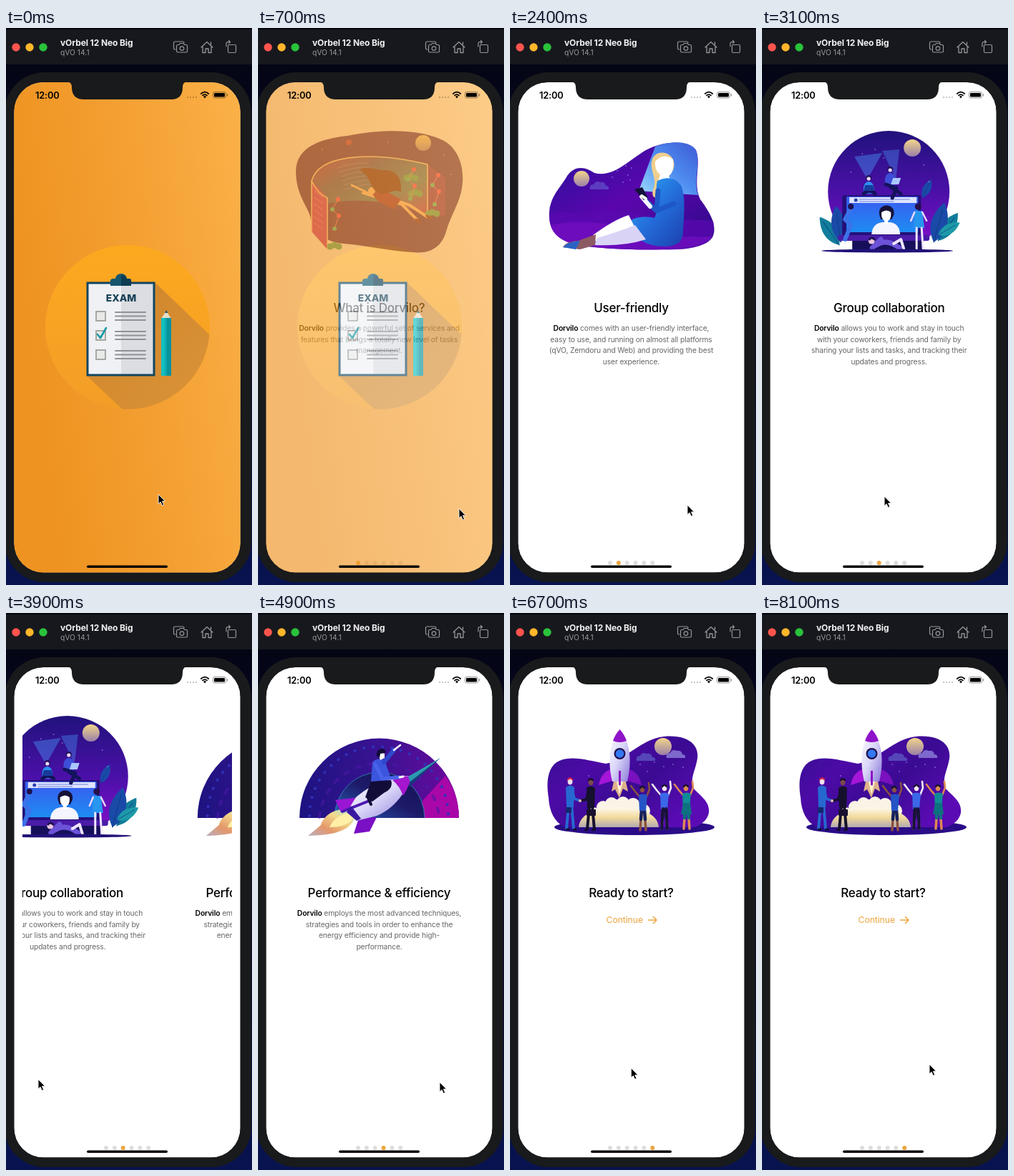
Write an HTML page that moves like this. It is 344x780 px and loops after 9 s.

```html
<!DOCTYPE html>
<html lang="en">
<head>
<meta charset="utf-8">
<title>Onboarding</title>
<style>
html, body { margin: 0; width: 100%; height: 100%; overflow: hidden; background: #05071c; }
svg { display: block; width: 344px; height: 780px; }
text { font-family: Inter, "Liberation Sans", sans-serif; }
.title { font-size: 17px; font-weight: 500; letter-spacing: -.25px; fill: #000; text-anchor: middle; }
.body { font-size: 10.3px; letter-spacing: -.13px; fill: #666; text-anchor: middle; }
.body tspan { font-weight: 600; fill: #000; }
</style>
</head>
<body>
<svg id="stage" viewBox="0 0 344 780"></svg>
<script>
const LOOP = 9000, STEP = 100, PAGE = 293, SWIPE = 600;
const SWIPES = [1420, 2560, 3689, 4960, 6045];
const FADE = [480, 1110];
const CURSOR = [
  [0, 213, 653], [100, 214, 654], [700, 281, 673], [1300, 262, 668], [1650, 52, 656],
  [2300, 248, 668], [2450, 248, 668], [2780, 48, 654], [3350, 256, 657], [3580, 254, 657],
  [3900, 45, 653], [4600, 254, 657], [4900, 254, 657], [5180, 50, 652], [5800, 244, 654],
  [6000, 236, 654], [6100, 195, 652], [6300, 38, 648], [6950, 234, 632], [9000, 234, 632]
];

// Drawing helpers
const p = (d, fill, more = '') => `<path d="${d}" fill="${fill}" ${more}/>`;
const l = (d, color, w = 2, more = '') =>
  `<path d="${d}" fill="none" stroke="${color}" stroke-width="${w}" stroke-linecap="round" stroke-linejoin="round" ${more}/>`;
const c = (x, y, r, fill, more = '') => `<circle cx="${x}" cy="${y}" r="${r}" fill="${fill}" ${more}/>`;
const e = (x, y, rx, ry, fill, more = '') => `<ellipse cx="${x}" cy="${y}" rx="${rx}" ry="${ry}" fill="${fill}" ${more}/>`;
const r = (x, y, w, h, fill, rx = 0, more = '') =>
  `<rect x="${x}" y="${y}" width="${w}" height="${h}" rx="${rx}" fill="${fill}" ${more}/>`;
const g = (body, more = '') => `<g ${more}>${body}</g>`;
const grad = (id, dir, ...colors) => {
  const [x1, y1, x2, y2] = dir;
  const stops = colors.map((k, i) => `<stop offset="${i / (colors.length - 1)}" stop-color="${k}"/>`).join('');
  return `<linearGradient id="${id}" x1="${x1}" y1="${y1}" x2="${x2}" y2="${y2}">${stops}</linearGradient>`;
};
const DOWN = [0, 0, 0, 1], RIGHT = [0, 0, 1, 0], DIAG = [0, 0, 1, 1];

const stars = (list, color = '#b8a8ff') => list.map(([x, y]) => c(x, y, .7, color)).join('');
const cloud = (x, y, k, fill) =>
  p('M-13 5Q-15 -2 -8 -2Q-5 -8 1 -5Q8 -6 9 0Q14 0 13 5Z', fill, `transform="translate(${x} ${y}) scale(${k})"`);
const leaf = (x, y, a, k, fill) =>
  g(p('M0 0C-9 -10 -7 -22 0 -32C8 -22 9 -10 0 0Z', fill) + l('M0 0V-26', '#0d3f86', .6),
    `transform="translate(${x} ${y}) rotate(${a}) scale(${k})"`);
const screen = fill => r(11.3, 76, 316.4, 686.5, fill, 41);

const defs = '<defs>' +
  grad('desk', DOWN, '#03040f', '#070a2c', '#050a35', '#081350') +
  grad('splashBg', [0, .3, 1, 0], '#ee9321', '#f4a033', '#fbb148') +
  grad('disc', DOWN, '#fda91f', '#f39d27') +
  grad('shade', DIAG, '#cf8428', '#dc963c') +
  grad('night', DIAG, '#25119a', '#5b06ad', '#2a0a86') +
  grad('dusk', DOWN, '#21127c', '#4a10a8', '#8a0fd0') +
  grad('violet', [0, 0, 1, .6], '#32108f', '#4c0aa6', '#3a0b92', '#5a0bb4') +
  grad('moon', DOWN, '#f3d58a', '#9a7fa8') +
  grad('dress', DIAG, '#2fb4f4', '#2470dd', '#1b3fae') +
  grad('beam', [0, 1, 1, 0], '#9edcff', '#4f8ef0', '#3c5ad6') +
  grad('hull', DIAG, '#ffffff', '#d9d6f8', '#8a78d8') +
  grad('fire', [1, 0, 0, 1], '#9ae4ee', '#f2d98a', '#e4976a', '#b9aec0') +
  grad('arc', RIGHT, '#1d1380', '#3a1292', '#6a0a9c') +
  grad('inner', [0, 1, 1, 0], '#2a62b8', '#1d1a6a', '#12134e') +
  grad('shield', RIGHT, '#b018d8', '#7d16d2', '#3f1cc4') +
  grad('smoke', DOWN, '#fffaf0', '#f2da9c', '#b3aab0') +
  grad('screen', DIAG, '#a81a78', '#31508e', '#2b8f9a', '#d8147a') +
  grad('laptop', DOWN, '#3a5bf0', '#1e8cf2') +
  `<clipPath id="view">${r(23, 105, PAGE, 636, '#000')}</clipPath>` +
  `<clipPath id="glass">${screen('#000')}</clipPath>` +
  `<clipPath id="round">${c(170, 419, 115, '#000')}</clipPath></defs>`;

// Illustrations
function library() {
  const blob = 'M53 200C54 165 90 155 125 151C170 142 225 140 260 158C285 172 290 205 284 230C279 250 270 262 264 282' +
    'C258 306 242 317 215 314C180 312 150 304 120 302C96 300 78 288 74 268C72 252 53 236 53 200Z';
  const node = (x, y, k) => c(x, y, 3, k);
  const chain = (x, y) => l(`M${x} ${y}l-8 14l9 9l-6 18`, '#f06a9a', 1) +
    node(x, y, '#ff2a7a') + node(x - 8, y + 14, '#20c090') + node(x + 1, y + 23, '#ff2a7a') + node(x - 5, y + 41, '#20c090');
  const bush = (x, y) => [0, 6, 12].map(d => c(x + d, y - d % 4, 4.5, '#2aa878')).join('');
  let rows = '';
  for (let i = 0; i < 6; i++) {
    rows += l(`M${112 + i * 2} ${196 + i * 6}q22 -8 42 -7`, '#8f86e0', 1, 'opacity=".6"');
    rows += l(`M79 ${228 + i * 9}l12 9`, '#f08ac0', 1, 'opacity=".7"');
  }
  return p(blob, '#34106c') +
    p('M75 214C84 183 150 170 237 191V264C205 244 140 236 97 246Z', 'url(#screen)', 'opacity=".75"') +
    p('M237 191L262 210V262L237 264Z', '#c01890', 'opacity=".35"') +
    p('M75 214L97 238V310L75 285Z', '#b81890') + rows +
    l('M75 285V214C84 180 150 170 237 191V264M75 214Q82 231 97 238V310', '#f5d6b0', 1.6) +
    c(231, 161, 11, 'url(#moon)') + stars([[90, 170], [127, 160], [260, 178], [270, 205], [182, 160]], '#ffd9a0') +
    c(127, 160, 4, '#a02060') + bush(208, 210) + bush(214, 232) + bush(238, 260) + bush(101, 306) +
    chain(218, 198) + chain(252, 206) + chain(112, 240) +
    l('M160 234L131 220M162 236L146 231', '#ffc39a', 3) +
    l('M182 243L200 246L222 268M188 240L212 248L236 264', '#ffc39a', 4) +
    l('M221 268l5 4M236 263l5 3', '#5a1030', 3.5) +
    p('M158 230L180 229L200 240L190 254L168 243Z', '#7a1048') + c(159, 228, 5, '#ffc39a') +
    p('M142 199C152 191 166 200 180 199C194 200 202 212 200 230C190 224 182 234 170 232C156 226 160 210 142 199Z', '#48102c');
}

function reader() {
  const blob = 'M55 266C53 238 70 225 80 207C92 190 108 196 118 203C144 210 165 186 190 171C214 158 248 156 260 171' +
    'C268 190 255 218 266 240C278 256 290 275 284 291C278 306 250 310 214 310C170 311 120 309 90 303C66 296 56 284 55 266Z';
  return p(blob, 'url(#night)') +
    p('M55 262C80 250 90 268 118 260C150 250 178 262 210 266L284 270C288 292 280 306 240 310C180 312 110 309 85 301C64 294 55 282 55 262Z', '#5a08b0', 'opacity=".75"') +
    p('M57 276Q110 266 160 280T284 292Q274 308 214 310C170 311 120 309 90 303C70 298 60 288 57 276Z', '#7c10c8', 'opacity=".55"') +
    p('M180 228L203 166C222 158 252 157 260 171C267 190 256 214 263 234Z', 'url(#beam)') +
    c(100, 211, 11, 'url(#moon)') + cloud(125, 221, 1, '#5b3cc0') +
    stars([[143, 209], [150, 200], [158, 216], [165, 206], [170, 196], [168, 213], [162, 193]]) +
    p('M199 184C204 170 225 172 229 187C232 200 222 206 218 214L210 238C200 240 197 234 201 224C206 210 194 198 199 184Z', '#f0cf8e') +
    p('M203 187Q214 174 228 184Q230 202 222 207L226 216H207L210 205Q202 200 203 187Z', '#fff') +
    p('M206 214C218 208 232 208 240 222C246 240 243 262 242 286C242 300 232 306 216 306C190 306 176 294 162 280C164 266 184 262 202 266C210 250 202 230 206 214Z', 'url(#dress)') +
    l('M207 228L205 256L190 242M205 256L229 246', '#1e58c8', 7) + l('M196 250L184 236', '#f7f5ff', 6) +
    p('M174 226l11 -3l8 15l-6 3Z', '#111138') + l('M190 239l-6 -4', '#fff', 4) +
    p('M166 262Q146 268 116 290L120 300Q154 292 176 282Z', '#ffffff') +
    p('M175 276Q150 286 122 294L118 304Q160 306 190 296Z', '#d9d4f6') +
    p('M120 289L95 298Q78 299 74 307L98 310L119 304Z', '#8d5a63') + p('M98 298Q80 299 74 307L92 310Z', '#2b63c4');
}

function team() {
  const person = (x, y, coat) => c(x, y, 4, '#231055') + c(x, y + 1, 2.6, '#e9d9ff') +
    p(`M${x - 7} ${y + 22}Q${x - 9} ${y + 6} ${x} ${y + 5}Q${x + 9} ${y + 6} ${x + 7} ${y + 22}Z`, coat);
  return c(169, 229, 85, 'url(#dusk)') +
    leaf(238, 298, 35, 1.5, '#117d9b') + leaf(232, 300, 15, 1.8, '#1a4aa8') + leaf(238, 290, 60, 1.1, '#1d9aa8') +
    leaf(100, 304, -35, 1.5, '#117d9b') + leaf(102, 300, -8, 1.6, '#1a4aa8') + leaf(216, 238, 25, .9, '#1a4aa8') +
    c(202, 168, 12, 'url(#moon)') + stars([[150, 170], [162, 182], [218, 192], [132, 176], [225, 215], [116, 202]]) +
    p('M139 212L121 180L160 175Z', '#4aa0ff', 'opacity=".4"') + p('M179 212L160 172L184 170Z', '#4aa0ff', 'opacity=".35"') +
    r(104, 234, 110, 58, '#241078', 3) + r(110, 236, 100, 50, 'url(#laptop)', 1) +
    r(114, 237, 94, 8, '#dfe4ff') + c(123, 241, 2.5, '#2840b8') + l('M128 240H198M128 243H176', '#7183dc', 1) +
    r(98, 290, 128, 8, '#4a1ca8', 3) + r(118, 298, 98, 14, '#16105a') +
    p('M145 289Q146 274 160 272H171Q184 274 185 289Z', '#f5f5ff') +
    p('M156 262C152 244 180 244 176 262L173 268H158Z', '#171138') + p('M159 258Q166 253 172 258Q173 268 168 270V275H163V270Q158 267 159 258Z', '#fff') +
    person(141, 210, '#2a8ff0') + person(171, 198, '#3d4ed8') +
    l('M134 232Q142 224 150 232M165 219L180 224L174 238M172 223L186 232', '#14135c', 5) +
    p('M175 210h11l-3 9h-11Z', '#a9c8ff') + p('M136 220h11l2 8h-15Z', '#173c9c') +
    l('M115 255L108 268L116 276L108 296', '#3b72e8', 6) + c(116, 250, 4, '#1d1150') +
    c(210, 250, 4.5, '#27104a') + p('M205 256H216L219 280H204Z', '#2796ee') +
    l('M208 280V310M215 280L217 310', '#f0e5ff', 3) + l('M205 258L200 270M216 258L222 270', '#e9d9ff', 2.5) +
    l('M152 304Q166 294 184 308M146 308L158 296', '#6b52d8', 7) + c(145, 298, 4.5, '#eac5df') + l('M142 296q3 -4 7 0', '#1d1150', 3) +
    l('M176 302L186 296L190 309', '#f0e5ff', 4) + e(167, 312, 92, 2.5, '#201278');
}

function rocketRide() {
  return p('M58 287A111 111 0 0 1 281 287Z', 'url(#arc)') +
    p('M230 263L262 228Q281 255 281 287H230Z', '#a907a8') +
    l('M72 284A97 97 0 0 1 266 284', '#3030b8', 4, 'stroke-dasharray=".1 13"') +
    l('M86 286A84 84 0 0 1 253 284', '#4a18a6', 4, 'stroke-dasharray="6 12" opacity=".6"') +
    p('M107 287A62 63 0 0 1 233 287Z', 'url(#inner)') + l('M107 287A62 63 0 0 1 233 287', '#34b3cf', 1, 'opacity=".6"') +
    p('M131 277C112 270 92 282 88 297L70 312C92 311 126 310 135 288Z', 'url(#fire)') +
    p('M128 279Q106 285 100 300Q124 300 134 287Z', '#fff0a8') +
    p('M142 258L108 262L116 279L134 274Z', '#9a16d4') + p('M166 286L156 306L134 309L141 287Z', '#7a0fc4') +
    p('M124 279L137 258C160 238 188 228 212 228C208 252 190 274 166 284L138 291Z', 'url(#hull)') +
    p('M188 234Q204 228 214 228Q213 240 203 256Q198 242 188 234Z', '#a516cf') +
    p('M210 229L255 203L214 240Z', '#2c9aae') + p('M213 236L255 203L211 244Z', '#18377e') +
    l('M118 278L158 262', '#4b18ae', 4) + p('M124 279L130 270L144 288L138 291Z', '#3818a0') +
    p('M160 209Q166 202 177 206L186 232L168 241L158 236Z', '#3b55dc') +
    l('M176 209L190 192', '#3048cc', 6) + l('M190 192L199 185', '#fff', 2.5) +
    l('M164 212L174 232L198 230', '#4a63ea', 5) + l('M198 230l5 -1', '#fff', 3) +
    p('M158 236L186 234Q190 246 176 252L160 264L150 258Z', '#120c38') + l('M154 259l4 9', '#120c38', 4) +
    p('M168 198Q172 193 177 197L177 203L171 206Z', '#fff') + p('M166 200Q165 190 174 190Q180 192 178 196L171 197L170 203Z', '#120c38');
}

function knights() {
  const knight = (x, y, k) => g(
    l('M-3 26L-7 42L-6 58M3 26L7 42L9 58', '#2a2e70', 5) +
    l('M-5 34L-7 42M-7 47L-6 56M6 34L7 42M8 47L9 56', '#d3d8f4', 3) +
    l('M-6 59h-4M9 59h4', '#8f9bd4', 3) +
    p('M-9 10Q0 5 9 10L7 21L4 28H-5L-7 21Z', '#3a4288') + p('M-7 11Q-2 9 -1 10V19L-6 20Z', '#e6e9fb') +
    p('M1 10Q6 9 7 11L6 19L1 20Z', '#9aa6dc') + p('M-6 22H6L8 31H1L0 27L-1 31H-8Z', '#c3caee') +
    l('M-9 12L-13 20L-11 26M9 12L13 19L10 25', '#2a2e70', 4) + c(-10, 11, 3, '#e6e9fb') + c(10, 11, 3, '#9aa6dc') +
    p('M-5 7V-2Q0 -8 5 -2V7L0 10Z', '#e6e9fb') + p('M0 -5Q5 -5 5 0V7L0 10Z', '#7482c2') + r(-3.5, 0, 8, 2, '#1a1a4a'),
    `transform="translate(${x} ${y}) scale(${k})"`);
  const sword = d => l(d, '#e7edff', 2) + l(d, '#7d8dd2', .6);
  const arm = p('M90 212C76 203 58 206 52 224C51 230 55 231 58 226C55 240 66 250 72 262C78 274 77 290 78 300H93' +
    'C94 276 88 258 76 246C66 236 64 222 72 217C70 226 74 234 84 238C80 228 82 220 90 218Z', '#0d0a2c');
  return p('M79 298C76 240 92 190 118 166C142 145 188 144 213 166C238 190 251 240 248 298Z', '#181265') +
    stars([[128, 174], [138, 164], [150, 160], [170, 158], [222, 198], [116, 190], [212, 188]]) + c(195, 171, 11, 'url(#moon)') +
    p('M50 298C46 274 64 252 88 249C108 236 134 248 162 246C194 242 220 238 244 250C270 256 282 276 273 298Q268 310 254 310H60Q53 308 50 298Z', 'url(#dusk)') +
    p('M163 164Q186 182 214 181C220 236 206 286 163 307C118 286 106 236 110 181Q140 182 163 164Z', '#5a14ac') +
    p('M163 172Q184 187 207 187C211 236 198 280 163 299C126 280 114 236 117 187Q142 187 163 172Z', 'url(#shield)') +
    p('M163 164Q186 182 214 181C220 236 206 286 163 307Z', '#281aa8', 'opacity=".35"') +
    e(164, 214, 25, 31, '#5d1696') + arm + g(arm, 'transform="translate(326 0) scale(-1 1)"') +
    sword('M114 212L118 242') + sword('M205 211L198 242') + knight(116, 239, .98) + knight(201, 239, .98) +
    p('M93 236L107 233L109 254L99 264Z', '#a45878') + p('M211 240L222 236L224 258L214 264Z', '#a45878') +
    sword('M138 207L135 258') + l('M130 253H141', '#dfe3fb', 2) + knight(159, 246, 1.06) + l('M150 258L137 257', '#c3caee', 3.5) +
    p('M159 250Q172 248 182 243Q187 265 172 282Q160 271 159 250Z', '#f2dfa8', 'stroke="#a5b5d5" stroke-width="1.5"') +
    p('M171 248L182 243Q187 265 172 282Z', '#8ec0d4', 'opacity=".5"');
}

function launch() {
  const blob = 'M54 259C50 236 53 214 69 207C88 199 110 207 134 211C164 205 182 177 215 173C245 170 265 182 262 204' +
    'C259 222 251 232 257 246C266 256 280 264 278 280C276 290 268 296 258 300H76C62 292 55 278 54 259Z';
  const walker = (x, y, suit, skin, hair, dir) =>
    l(`M${x - 2} ${y + 33}L${x - 5} ${y + 66}M${x + 2} ${y + 33}L${x + 5} ${y + 66}`, suit, 4) +
    l(`M${x - 5} ${y + 67}h${3 * dir}M${x + 5} ${y + 67}h${3 * dir}`, '#120d2c', 2.5) +
    p(`M${x - 6} ${y + 8}Q${x} ${y + 3} ${x + 6} ${y + 8}L${x + 5} ${y + 36}H${x - 5}Z`, suit) +
    l(`M${x + 3 * dir} ${y + 10}L${x + 6 * dir} ${y + 24}L98 263`, suit, 3.5) +
    e(x, y, 3.4, 4.4, skin) + l(`M${x - 3} ${y - 3}q3 -3 6 0`, hair, 2.4);
  const cheer = (x, y, top, legs, skin, lean) =>
    l(`M${x - 5} ${y + 10}L${x - 11} ${y + 3}L${x - 17} ${y - 5}M${x + 5} ${y + 10}L${x + 9} ${y}L${x + 8} ${y - 9}`, skin, 2.6) +
    l(`M${x - 2} ${y + 29}L${x - 4} ${y + 57}M${x + 2} ${y + 29}L${x + 4} ${y + 57}`, skin, 3.5) +
    l(`M${x - 2} ${y + 29}L${x - 3} ${y + 42}M${x + 2} ${y + 29}L${x + 3} ${y + 42}`, legs, 4.5) +
    p(`M${x - 6} ${y + 8}Q${x} ${y + 5} ${x + 6} ${y + 8}L${x + 4} ${y + 30}H${x - 5}Z`, top) +
    e(x + lean, y, 3.3, 4.2, skin) + l(`M${x - 3 + lean} ${y - 2}q3 -4 6 0`, '#19102e', 2.6);
  const puffs = [[142, 267, 9], [130, 272, 9], [117, 281, 9], [158, 266, 9], [172, 269, 10], [186, 277, 10], [150, 273, 12]]
    .map(([x, y, k]) => c(x, y, k, '#faf4e6')).join('');
  return e(174, 300, 112, 11, '#2a0c88') + p(blob, 'url(#violet)') +
    c(214, 187, 12, 'url(#moon)') + cloud(190, 202, 1, '#5546b8') + cloud(232, 198, 1, '#7d68cc') +
    stars([[182, 212], [202, 209], [215, 215], [228, 212], [242, 216], [192, 222], [110, 228]]) +
    puffs + p('M96 300Q98 274 152 272Q206 274 208 300Z', 'url(#smoke)') +
    p('M145 236H162L165 250L158 246L153 259L147 247L142 250Z', '#ddb28c') + p('M149 236H158L153 254Z', '#fff4cf') +
    p('M140 219Q127 224 124 241L143 235Z', '#a516d8') + p('M167 219Q181 224 184 241L164 235Z', '#7911be') +
    p('M153.500 163C139 181 136 207 143 236H164C171 207 168 181 153.500 163Z', 'url(#hull)') +
    p('M153.500 163Q147 170 144 179Q153 183 163 179Q160 170 153.500 163Z', '#8f14c9') +
    c(153.5, 197, 8, '#20124e') + c(153.5, 197, 5.8, '#3478f4') + l('M153.500 222V240', '#8a14c4', 3) +
    walker(84, 236, '#2668d0', '#efe0ec', '#d82a4c', 1) + walker(113, 237, '#15102b', '#7a4a4e', '#150c22', -1) +
    r(78, 272, 8, 8, '#14266e', 1) + r(107, 275, 13, 9, '#1a112f', 1) + c(98, 263, 2, '#e6c0b8') +
    cheer(186, 247, '#2454c6', '#18205c', '#8a5140', -1) +
    cheer(216, 245, '#3a68e8', '#181238', '#f2e8f4', 0) + l('M214 274L212 302M218 274L220 302', '#181238', 4) +
    cheer(247, 245, '#108a96', '#0d7180', '#dd8a52', -1) + p('M242 266H252L254 282H239Z', '#0d7180');
}

// Pages
const PAGES = [
  [library, 'What is Dorvilo?', ['*Dorvilo* provides a powerful set of services and', 'features that brings a totally new level of tasks', 'management.']],
  [reader, 'User-friendly', ['*Dorvilo* comes with an user-friendly interface,', 'easy to use, and running on almost all platforms', '(qVO, Zemdoru and Web) and providing the best', 'user experience.']],
  [team, 'Group collaboration', ['*Dorvilo* allows you to work and stay in touch', 'with your coworkers, friends and family by', 'sharing your lists and tasks, and tracking their', 'updates and progress.']],
  [rocketRide, 'Performance &amp; efficiency', ['*Dorvilo* employs the most advanced techniques,', 'strategies and tools in order to enhance the', 'energy efficiency and provide high-', 'performance.']],
  [() => g(knights(), 'transform="translate(7 0)"'), 'Security &amp; privacy', ['at *Quenvar* we take privacy very seriously and', 'we work hard to ensure that your data remains', 'secure by implementing sophisticated security', 'measures.']],
  [launch, 'Ready to start?', []]
];
const bold = s => s.replace(/\*(.+?)\*/, '<tspan>$1</tspan>');
const page = ([art, title, lines], i) => g(
  art() + `<text class="title" x="169.5" y="398">${title}</text>` +
  lines.map((s, n) => `<text class="body" x="169.5" y="${424 + n * 15.6}">${bold(s)}</text>`).join('') +
  (i === 5 ? '<text x="134.500" y="434.300" font-size="12.300" letter-spacing="-.1" fill="#eba63f">Continue</text>' +
    l('M193.500 430H205M200.500 425.500L205 430L200.500 434.500', '#eba63f', 1.6) : ''), 'class="page"');

function splash() {
  const row = y => r(126, y, 13, 13, '#e9eae8', 0, 'stroke="#989d98" stroke-width="1.7"') +
    [1, 6.5, 12].map(d => l(`M153 ${y + d}H195`, '#8f9196', 1.9)).join('');
  return r(11, 76, 317, 687, 'url(#splashBg)') + c(170, 419, 115, 'url(#disc)') +
    g(p('M208 356L310 454V560H190L113 487Z', 'url(#shade)'), 'clip-path="url(#round)"') +
    r(114, 357, 93, 129, '#f0f1f4') + r(161, 357, 46, 129, '#dbdde2') +
    r(114, 357, 93, 129, 'none', 0, 'stroke="#124660" stroke-width="3"') +
    p('M146 361V354Q146 351 150 351H153A8 7 0 0 1 169 351H172Q175 351 175 354V361Z', '#15566f') +
    p('M161 346A8 6 0 0 1 169 351H172Q175 351 175 354V361H161Z', '#0d3c52') +
    '<text x="161" y="382.500" font-size="13.800" font-weight="800" fill="#174257" text-anchor="middle">EXAM</text>' +
    [397, 424, 451].map(row).join('') + l('M128 429L132 434L140 420', '#159aa4', 2.6) +
    p('M217 407L224 396L231 407Z', '#e9dcc4') + p('M222 399L224 395L226.500 399Z', '#2c5a66') +
    r(217, 406, 7, 81, '#12bfc0') + r(224, 406, 7, 81, '#0a929c') + r(222, 406, 3, 81, '#0ca9ae');
}

// Window and device
const GREY = '#96969b';
const bar = r(0, 0, 344, 780, 'url(#desk)') + r(0, 2, 344, 49, '#17181d') +
  c(14, 27, 5.7, '#ff544d') + c(33, 27, 5.7, '#fdb62a') + c(52, 27, 5.7, '#29c33b') +
  '<text x="76" y="24.500" font-size="12" font-weight="700" letter-spacing="-.1" fill="#f2f2f3">vOrbel 12 Neo Big</text>' +
  `<text x="76" y="38" font-size="10.300" fill="${GREY}">qVO 14.1</text>` +
  l('M237 30H236Q234.500 30 234.500 28V21Q234.500 19 236.500 19H247Q249 19 249 21', GREY, 1.2) +
  l('M240 23.500H242L243.500 21.500H248L249.500 23.500H252Q253.500 23.500 253.500 25V32.500Q253.500 34 252 34H240Q238.500 34 238.500 32.500V25Q238.500 23.500 240 23.500Z', GREY, 1.2) +
  c(246, 28.6, 2.8, 'none', `stroke="${GREY}" stroke-width="1.2"`) +
  l('M273 27L281 19.500L289 27M275 26V34.500H279V29H283V34.500H287V26M286.500 20V23', GREY, 1.3) +
  l('M312 23.500H320Q321.500 23.500 321.500 25V33Q321.500 34.500 320 34.500H312Q310.500 34.500 310.500 33V25Q310.500 23.500 312 23.500ZM308 26V22Q308 19.500 310.500 19.500H313.500M311.500 17.500L313.500 19.500L311.500 21.500', GREY, 1.2);
const frame = r(-2, 62, 345, 714, '#191a1b', 56);
const status = p('M86 75Q92 76 92 83Q92 100 109 100H231Q247 100 247 83Q247 76 253 75Z', '#191a1b') +
  '<text x="41" y="98.500" font-size="12.800" font-weight="600" letter-spacing="-.15" fill="#000">12:00</text>' +
  [254, 258, 262, 266].map(x => c(x, 97, 1.1, '#000', 'opacity=".28"')).join('') +
  l('M272.800 92Q278 87.300 283.200 92M275 94.400Q278 91.800 281 94.400', '#000', 1.8) + p('M276 96L278 94.800L280 96L278 98.500Z', '#000') +
  r(289.5, 89.5, 18, 8.5, 'none', 2.5, 'stroke="#000" stroke-opacity=".4" stroke-width="1"') + r(291, 91, 15, 5.5, '#000', 1.3) +
  r(309, 92, 1.2, 3.6, '#000', .5, 'opacity=".45"');
const dots = [0, 1, 2, 3, 4, 5].map(i => c(140 + i * 11.85, 749, 3, '#dedede', 'class="dot"')).join('');
const arrow = p('M0 0V13.500L3.100 10.700L5.300 15.700L7.700 14.700L5.500 9.800H9.600Z', '#000', 'stroke="#fff" stroke-width=".9" id="cursor"');

const stage = document.getElementById('stage');
stage.innerHTML = defs + bar + frame +
  g(screen('#fff') + g(PAGES.map(page).join(''), 'clip-path="url(#view)"') + dots +
    g(splash(), 'id="splash"'), 'clip-path="url(#glass)"') +
  status + r(113, 752.5, 113, 3.6, '#0a0805', 1.8) + arrow;

const pages = stage.querySelectorAll('.page'), marks = stage.querySelectorAll('.dot');
const cover = document.getElementById('splash'), cursor = document.getElementById('cursor');
const unit = x => Math.min(1, Math.max(0, x));
const ease = x => (x = unit(x)) * x * (3 - 2 * x);

function render(t) {
  const pos = SWIPES.reduce((sum, start) => sum + ease((t - start) / SWIPE), 0);
  pages.forEach((el, i) => {
    el.setAttribute('transform', `translate(${(i - pos) * PAGE} 0)`);
    el.style.display = Math.abs(i - pos) < 1 ? '' : 'none';
  });
  marks.forEach((el, i) => el.setAttribute('fill', i === Math.round(pos) ? '#eba63f' : '#dedede'));
  cover.setAttribute('opacity', 1 - unit((t - FADE[0]) / (FADE[1] - FADE[0])));
  const n = CURSOR.findIndex(k => k[0] > t), [t0, x0, y0] = CURSOR[n - 1], [t1, x1, y1] = CURSOR[n];
  const k = ease((t - t0) / (t1 - t0));
  cursor.setAttribute('transform', `translate(${x0 + (x1 - x0) * k} ${y0 + (y1 - y0) * k})`);
}

const begin = performance.now();
function tick() {
  const t = (performance.now() - begin) % LOOP;
  render(Math.floor(t / STEP) * STEP);
  requestAnimationFrame(tick);
}
tick();
</script>
</body>
</html>
```
